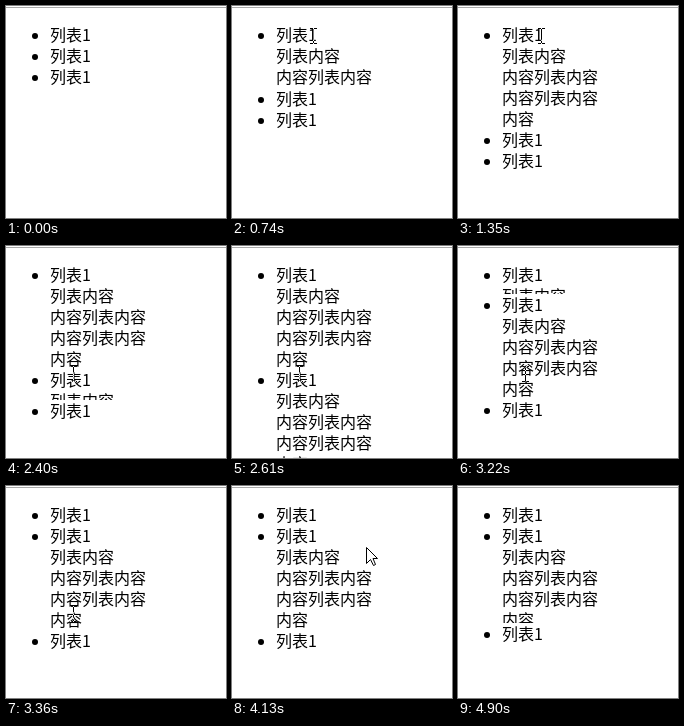
Animation of 220 by 212 pixels, one loop 4.97 s. Source, as an HTML page with a canvas:

```html
<!DOCTYPE html>
<html lang="zh">
<head>
<meta charset="utf-8">
<title>列表</title>
<style>
html, body { margin: 0; width: 100%; height: 100%; overflow: hidden; background: #fff; }
canvas { display: block; width: 220px; height: 212px; }
</style>
</head>
<body>
<canvas id="stage" width="220" height="212"></canvas>
<script>
const ctx = document.getElementById('stage').getContext('2d', { alpha: false });
const W = 220, H = 212, LOOP = 4970, STEP = 70;
const LINE = 21, TOP = 18, LEFT = 44;
const MAX_HEIGHT = 100, EASE_MS = 400;
const LINES = ['列表内容', '内容列表内容', '内容列表内容', '内容'];

// The picture advances in steps, counted anew whenever the pointer wakes.
const WAKE = [0, 250, 1350, 3010];

const ITEMS = [
  { open: 636, close: 2963 },
  { open: 2359, close: 4831 },
  { open: Infinity, close: Infinity }
];

// Pointer strokes are quadratic curves; each one takes over at "from".
const STROKES = [
  { from: 250, start: 250, end: 740, a: [154, -10], via: [125, 10], b: [81, 30] },
  { from: 1350, start: 1630, end: 2400, a: [83, 30], via: [73, 112], b: [67, 128] },
  { from: 3710, start: 3710, end: 4270, a: [67, 128], via: [100, 160], b: [164, -13] }
];
const POINTER_GONE = 4410;

const clamp = p => Math.max(0, Math.min(1, p));

function snap(t) {
  const base = WAKE.filter(w => w <= t).pop();
  return base + Math.floor((t - base) / STEP) * STEP;
}

// CSS "ease": cubic-bezier(.25, .1, .25, 1)
function ease(p) {
  if (p <= 0 || p >= 1) return clamp(p);
  const cubic = (u, a, b) => 3 * (1 - u) * (1 - u) * u * a + 3 * (1 - u) * u * u * b + u ** 3;
  let lo = 0, hi = 1;
  for (let i = 0; i < 24; i++) {
    const mid = (lo + hi) / 2;
    if (cubic(mid, 0.25, 0.25) < p) lo = mid; else hi = mid;
  }
  return cubic(lo, 0.1, 1);
}

// Max-height grows past the content, so the content caps it.
function panelHeight({ open, close }, t) {
  const shown = ease((t - open) / EASE_MS) - ease((t - close) / EASE_MS);
  return Math.round(Math.min(LINES.length * LINE, MAX_HEIGHT * shown));
}

function text(str, y) {
  ctx.fillText(str, LEFT, y + 17);
}

function drawList(t) {
  ctx.fillStyle = '#000';
  ctx.font = '350 16px "Noto Sans CJK SC", sans-serif';
  let y = TOP;
  for (const item of ITEMS) {
    ctx.beginPath();
    ctx.arc(29, y + 12, 3, 0, Math.PI * 2);
    ctx.fill();
    text('列表1', y);
    y += LINE;

    const h = panelHeight(item, t);
    ctx.save();
    ctx.beginPath();
    ctx.rect(0, y, W, h);
    ctx.clip();
    LINES.forEach((line, i) => text(line, y + i * LINE));
    ctx.restore();
    y += h;
  }
}

function pointerAt(t) {
  const stroke = STROKES.filter(s => s.from <= t).pop();
  if (!stroke || t >= POINTER_GONE) return null;
  const { start, end, a, via, b } = stroke;
  const p = clamp((t - start) / (end - start)), q = 1 - p;
  return [0, 1].map(i => Math.round(q * q * a[i] + 2 * p * q * via[i] + p * p * b[i]));
}

// The text cursor inverts whatever lies below it.
function drawBeam(x, y) {
  ctx.save();
  ctx.globalCompositeOperation = 'difference';
  ctx.fillStyle = '#fff';
  ctx.fillRect(x, y - 7, 1, 14);
  for (const row of [y - 8, y + 7]) {
    ctx.fillRect(x - 3, row, 3, 1);
    ctx.fillRect(x + 1, row, 3, 1);
  }
  ctx.restore();
}

function drawArrow(x, y) {
  ctx.save();
  ctx.translate(x + 0.5, y + 0.5);
  const shape = new Path2D('M0 0V16L4 12L7 18L9 17L6.5 11H11Z');
  ctx.fillStyle = '#fff';
  ctx.fill(shape);
  ctx.strokeStyle = '#000';
  ctx.stroke(shape);
  ctx.restore();
}

function draw(t) {
  ctx.fillStyle = '#fff';
  ctx.fillRect(0, 0, W, H);
  ctx.fillStyle = '#a9a9a9';
  ctx.fillRect(0, 1, W, 1);
  drawList(t);
  const pointer = pointerAt(t);
  if (pointer) (pointer[0] > 86 ? drawArrow : drawBeam)(...pointer);
}

const begin = performance.now();
function tick() {
  draw(snap((performance.now() - begin) % LOOP));
  requestAnimationFrame(tick);
}
tick();
</script>
</body>
</html>
```
